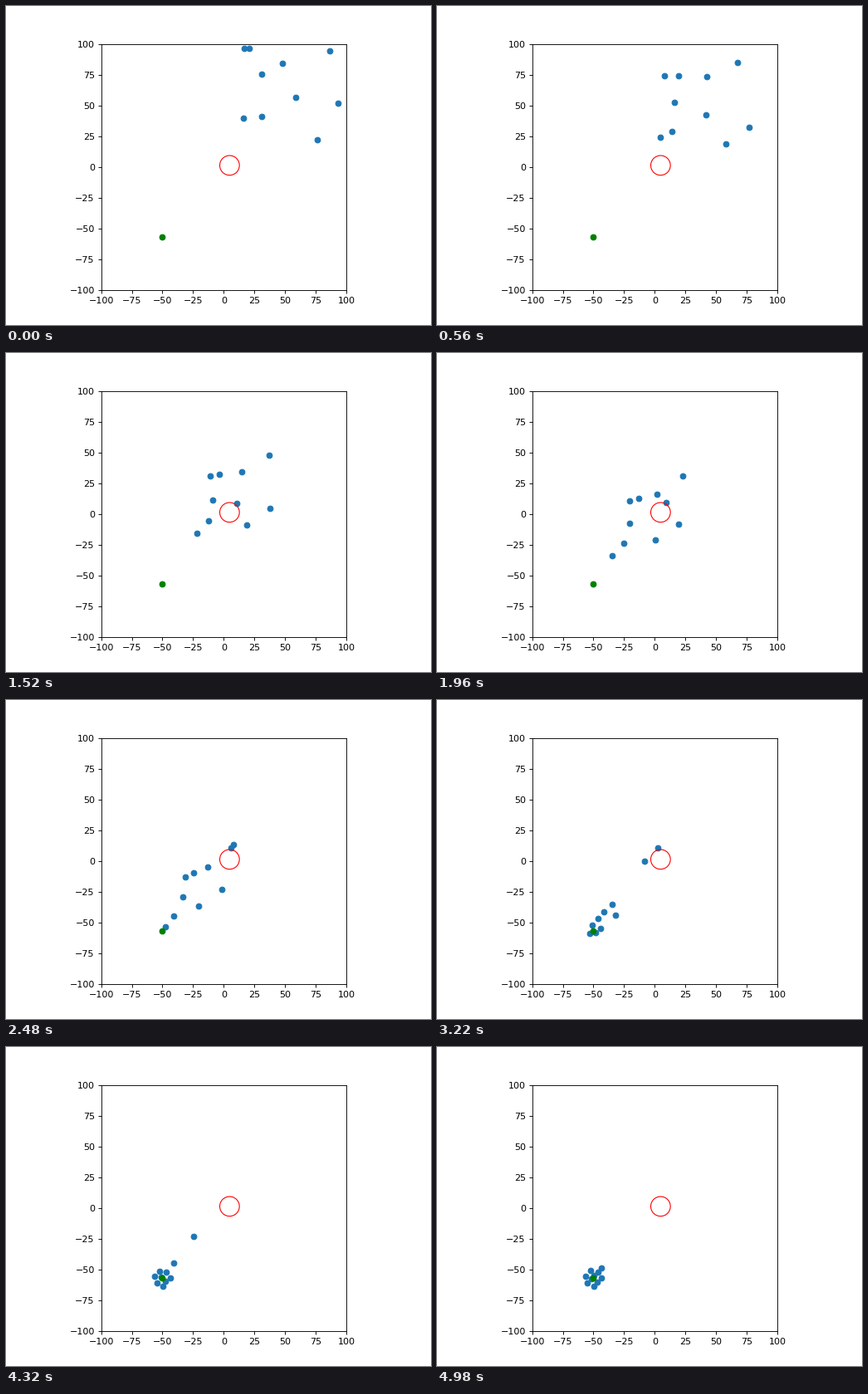
A matplotlib script for the animation above (5000 ms loop, 512 px wide and 384 px high).

```python
import numpy as np
import matplotlib.pyplot as plt
from matplotlib.animation import FuncAnimation

STEPS = 250
GOAL = np.array([-50.2, -57.0])
CENTER, RADIUS = np.array([4.7, 1.4]), 8

TURN = 27               # steps until the first velocity is forgotten
SLOW = 10               # distance to the goal where agents start to brake
GAP, PUSH = 7.5, 1.2    # reach and strength of the separation
KEEP, SLIDE = 9.5, 0.38  # distance kept from the obstacle, speed along it

# x, y and first velocity of each agent
AGENTS = np.array([
    (86.3, 94.6, -0.69, 0.11),
    (93.2, 52.0, -0.35, -0.84),
    (76.2, 22.3, -0.48, 0.36),
    (58.6, 56.8, -0.52, -0.25),
    (47.8, 84.5, 0.23, 0.05),
    (30.8, 75.7, -0.57, -0.77),
    (16.7, 96.7, -0.12, -0.65),
    (20.7, 96.7, 0.29, -0.68),
    (30.8, 41.2, -0.61, -0.04),
    (16.0, 39.9, -0.24, -0.26),
])


def length(v):
    return np.linalg.norm(v, axis=-1, keepdims=True)


def seek(pos):
    to_goal = GOAL - pos
    return to_goal / np.maximum(length(to_goal), SLOW)


def separate(pos):
    away = pos[:, None] - pos[None]
    dist = length(away)
    dist[dist == 0] = np.inf
    return (PUSH * np.clip(1 - dist / GAP, 0, 1) * away / dist).sum(axis=1)


def move(pos, vel):
    """Advance by vel; agents that meet the obstacle creep along its rim."""
    new = pos + vel
    out = new - CENTER
    dist = length(out)
    rim = CENTER + KEEP * out / dist
    return np.where(dist < KEEP, pos + SLIDE * (rim - pos), new)


def fly():
    pos, first = AGENTS[:, :2], AGENTS[:, 2:]
    track = [pos]
    for step in range(STEPS - 1):
        w = min((step + 0.5) / TURN, 1)
        vel = (1 - w) * first + w * seek(pos) + separate(pos)
        pos = move(pos, vel / np.maximum(length(vel), 1))
        track.append(pos)
    return np.array(track)


track = fly()

fig, ax = plt.subplots(figsize=(6.4, 4.8), dpi=80)
ax.set_aspect("equal")
ax.set_xlim(-100, 100)
ax.set_ylim(-100, 100)
ax.add_patch(plt.Circle(CENTER, RADIUS, color="r", fill=False, zorder=3))
dots, = ax.plot([], [], "o", color="C0")
ax.plot(*GOAL, "go")


def update(step):
    dots.set_data(*track[step].T)
    return dots,


anim = FuncAnimation(fig, update, frames=STEPS, interval=20,
                     repeat=True, repeat_delay=0)
plt.show()
```
